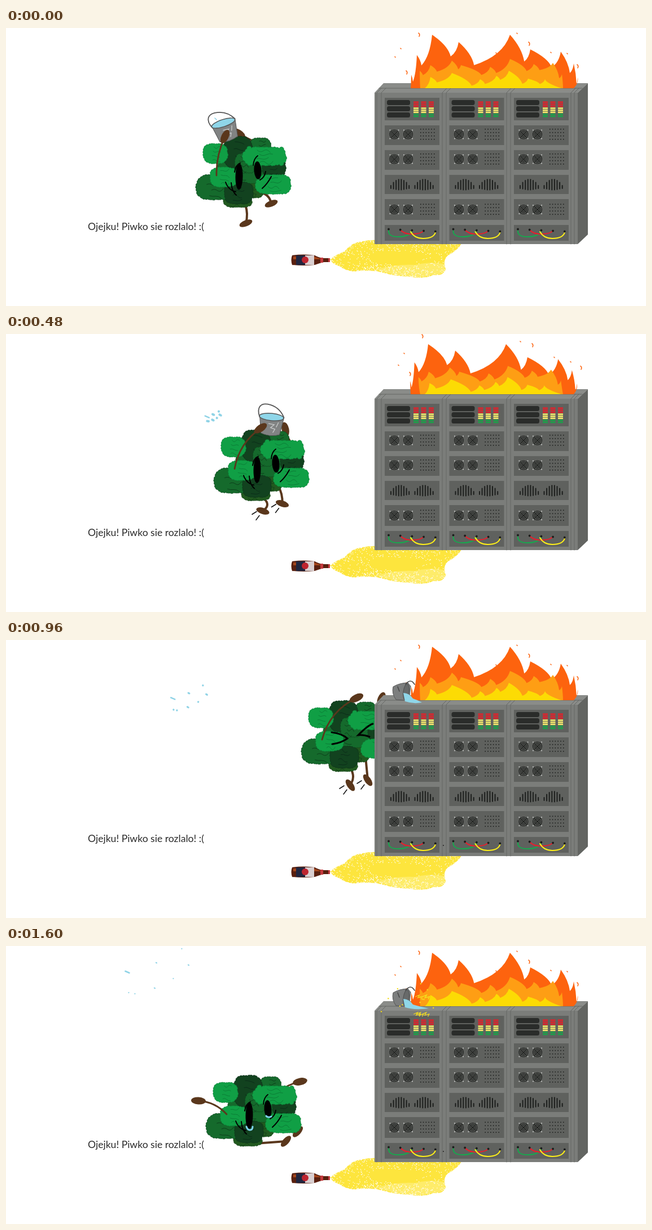
Animation, 1134 px wide and 494 px high, one loop 1760 ms. Source, as an HTML page:

```html
<!DOCTYPE html>
<html lang="pl">
<head>
<meta charset="utf-8">
<title>Piwko</title>
<style>
html, body { margin: 0; width: 100%; height: 100%; overflow: hidden; background: #fff; }
svg { display: block; width: 100%; height: 100%; }
</style>
</head>
<body>
<svg viewBox="0 0 1134 494" preserveAspectRatio="none">
  <path id="puddle" fill="#fde53d" d="M574 411Q588 401 600 397Q612 381 632 379Q650 375 670 378L807 383Q800 396 783 404Q773 414 779 428Q776 441 758 439Q738 447 716 442Q685 441 657 432Q632 430 616 433Q598 430 590 423Q578 419 574 411Z"/>
  <path fill="#feec6a" d="M656 429Q690 419 725 421Q755 414 778 420L777 433Q768 440 756 438Q735 446 714 441Q685 440 656 429Z"/>
  <path id="foam" stroke="#fff" stroke-width="1.2"/>
  <path fill="#59200f" d="M507 404Q528 401 547 404Q556 409 564 409L574 409V416L563 416Q555 418 547 421Q528 423 507 421Q504 412 507 404Z"/>
  <path fill="#a4461b" d="M509 406H546L560 411H509Z"/>
  <path fill="#20263f" d="M514 404H530V421H514Z"/>
  <path fill="#d9cfd0" d="M530 404H546V421H530Z"/>
  <circle cx="530" cy="412" r="6" fill="#bd2530"/>
  <path fill="#c43a3e" d="M557 408H562V417H557ZM571 409H574V416H571Z"/>
  <text x="145" y="358.5" font-family="Lato, 'Open Sans', sans-serif" font-size="17.6" fill="#2b2b2b">Ojejku! Piwko sie rozlalo! :(</text>
  <g id="drops" stroke="#8fd3e6" fill="#8fd3e6" stroke-linecap="round"></g>
  <g id="back"></g>
  <g id="bush"></g>
  <g id="front"></g>
  <g id="face" fill="none" stroke="#000" stroke-linecap="round"></g>
  <path id="marks" fill="none" stroke="#111" stroke-width="1.5" stroke-linecap="round"/>
  <g id="rack"></g>
  <g id="fire"></g>
  <g id="spill"></g>
</svg>
<script>
const $ = id => document.getElementById(id);
const STEP = 160, COUNT = 11, RAD = Math.PI / 180;

let seed = 7;
const rnd = (a = 0, b = 1) => a + (b - a) * ((seed = (seed * 16807) % 2147483647) / 2147483647);
const n1 = v => Math.round(v * 10) / 10;
const mix = (a, b, t) => a + (b - a) * t;
const range = n => [...Array(n).keys()];
const path = (d, attrs = '') => `<path d="${d}" ${attrs}/>`;
const line = (d, color, width) => path(d, `fill="none" stroke="${color}" stroke-width="${width}" stroke-linecap="round"`);
const rect = (x, y, w, h, fill, rx = 0) =>
  `<rect x="${n1(x)}" y="${n1(y)}" width="${n1(w)}" height="${n1(h)}" rx="${rx}" fill="${fill}"/>`;
const oval = (x, y, rx, ry, rot, attrs) =>
  `<ellipse cx="${n1(x)}" cy="${n1(y)}" rx="${rx}" ry="${ry}" transform="rotate(${n1(rot)} ${n1(x)} ${n1(y)})" ${attrs}/>`;
const dot = (x, y, r, fill) => oval(x, y, r, r, 0, `fill="${fill}"`);

// White specks, densest along the puddle's edge
function foam() {
  const p = $('puddle'), len = p.getTotalLength();
  return range(700).map(() => {
    const a = p.getPointAtLength(rnd() * len), k = rnd() ** 2.2 * 0.6;
    return `M${n1(mix(a.x, 690, k))} ${n1(mix(a.y, 410, k))}h1.2`;
  }).join('');
}

// ---- server rack ----
function fan(x, y) {
  const ink = '#1b1d1b';
  let s = line(`M${x - 7} ${y - 7}l14 14m0 -14l-14 14`, ink, 0.8) + dot(x, y, 1.6, ink);
  for (const r of [8, 5.6, 3.2]) s += `<circle cx="${x}" cy="${y}" r="${r}" fill="none" stroke="${ink}" stroke-width="1.1"/>`;
  for (const a of [-7.5, 7.5]) for (const b of [-7.5, 7.5]) s += dot(x + a, y + b, 1.1, '#c9cbc9');
  return s;
}
function cabinet() {
  let s = '';
  for (const [y, h] of [[124, 40], [173, 35], [217, 35], [261, 34], [304, 37], [350, 28]])
    s += rect(671, y, 97, h, '#5f615e');
  for (const y of [128, 139, 150]) s += rect(675, y, 41, 9, '#2a2c2a', 3.5);
  for (const c of range(3)) for (const r of range(8))
    s += rect(722 + c * 13.5, 130.5 + r * 3.6, 9, 2.6, r < 3 ? '#e3202a' : r < 6 ? '#f6ec6c' : '#1ca049');
  for (const y of [189, 233, 322.5]) {
    s += fan(688, y) + fan(712.5, y);
    for (const c of range(6)) for (const r of range(4)) s += rect(734 + c * 4.8, y - 10 + r * 6, 1.5, 1.5, '#171917');
  }
  for (const cx of [698, 740.5]) for (const i of range(8)) {
    const u = Math.abs(i - 3.5) / 3.5, top = 268 + 11 * u * u;
    s += rect(cx - 17 + i * 4.6, top, 2, 289 - 3 * u - top, '#1d1f1d', 1);
  }
  s += line('M678 360Q677 371 695 371Q714 371 719 361', '#17a84e', 2)
     + line('M698 358Q706 367 720 366Q736 366 740 360', '#ec1c2b', 2)
     + line('M717 362Q724 374 739 374Q758 374 761 363', '#fff018', 2);
  return s + range(5).map(i => dot(678 + i * 20.7, 357.5 + i, 1.9, '#1b1d1b')).join('');
}
function rack() {
  let s = path('M653 115L669 98H1031L1013 115Z', 'fill="#8a8c89"')
        + path('M1013 115L1031 98V367L1013 384Z', 'fill="#636562"')
        + rect(653, 115, 360, 269, '#7b7d7a');
  let d = 'M661 107H1021';
  for (const x of [657, 665, 773, 780, 887, 894, 1001, 1007]) d += `M${x} 384V115l8 -8`;
  s += line(d, '#666865', 1);
  const c = cabinet();
  return s + range(3).map(i => `<g transform="translate(${i * 114.5})">${c}</g>`).join('');
}

// ---- fire: each layer is a row of tips; valleys follow from the gaps ----
const layers = [
  { fill: '#fd630e', from: 717, to: 1006, dip: 9, slope: 0.35,
    tips: [[718, 83], [728, 48], [755, 12], [802, 25], [893, 12], [929, 38], [983, 42], [1006, 63], [1013, 88]] },
  { fill: '#fe9e14', from: 734, to: 987, dip: 4, slope: 0.2,
    tips: [[733, 76], [752, 66], [790, 58], [806, 66], [858, 69], [893, 55], [935, 64], [969, 62], [985, 82]] },
  { fill: '#fcdb04', from: 742, to: 984, dip: 4, slope: 0.15,
    tips: [[752, 87], [790, 80], [840, 91], [869, 85], [891, 76], [925, 90], [955, 91]] }
];
const embers = [[709, 76], [699, 36], [689, 51], [731, 9], [868, 44], [905, 9], [926, 25], [965, 43], [994, 45], [1012, 65]];

function layer({ fill, from, to, dip, slope, tips }, sway) {
  const pts = tips.map(([x, y]) => {
    const lift = sway * (107 - y) / 95;
    return [x - 7 * lift, y + 6 * lift * lift];
  });
  let [a, b] = [from, 107], d = `M${a} ${b}`;
  const curve = (cx, cy, x, y) => { d += `Q${n1(cx)} ${n1(cy)} ${n1(x)} ${n1(y)}`; [a, b] = [x, y]; };
  pts.forEach(([x, y], i) => {
    curve(mix(a, x, 0.8), mix(b, y, 0.3), x, y);
    const next = pts[i + 1];
    if (!next) return curve(x + 2, 98, to, 107);
    const gap = next[0] - x, vx = mix(x, next[0], y > next[1] ? 0.3 : 0.7);
    const vy = Math.max(y, next[1]) + dip + slope * gap;
    curve(mix(x, vx, 0.85), mix(y, vy, 0.5), vx, vy);
  });
  return path(d + 'Z', `fill="${fill}"`);
}
const fire = sway => layers.map(l => layer(l, sway)).join('')
  + line(embers.map(([x, y], i) => `M${x + sway * 6} ${y + sway * (i % 3 * 6 - 8)}` + (i % 3 ? 'l1 1' : 'q3 2 1 6')).join(''), '#fc6512', 1.6);

// ---- bush ----
function blob(cx, cy, rx, ry, fill, ink) {
  const n = Math.round((rx + ry) * 0.7);
  const ring = range(n).map(i => {
    const a = i / n * 2 * Math.PI, c = Math.cos(a), s = Math.sin(a);
    const r = (Math.abs(c / rx) ** 3 + Math.abs(s / ry) ** 3) ** (-1 / 3) * rnd(0.93, 1);
    return `${n1(cx + c * r)} ${n1(cy + s * r)}`;
  });
  const folds = range(4).map(i => {
    const w = rx * 0.3;
    return `M${n1(cx + rx * rnd(-0.6, -0.1))} ${n1(cy + ry * (i / 3 - 0.5) * 1.3)}q${n1(w / 2)} ${n1(rnd(-6, 6))} ${n1(w)} 1t${n1(w)} ${n1(rnd(-4, 4))}`;
  });
  return path('M' + ring.join('A4 4 0 0 1 ') + 'Z', `fill="${fill}" stroke="${ink}" stroke-width=".6"`)
       + line(folds.join(''), ink, 1);
}
function bush() {
  const mid = ['#156a2c', '#0c3f1b'], dark = ['#12421f', '#0b2c19'], lit = ['#109f45', '#0b7d36'], moss = ['#21591f', '#12401a'];
  return [
    [420, 257, 46, 40, mid], [411, 307, 26, 12, moss], [440, 289, 17, 13, moss], [451, 212, 19, 17, mid],
    [411, 221, 27, 29, dark], [475, 247, 21, 19, dark], [425, 240, 20, 18, mid], [371, 283, 35, 23, mid],
    [412, 293, 26, 20, dark], [371, 223, 22, 18, lit], [458, 228, 39, 17, lit], [386, 265, 25, 18, lit], [474, 278, 32, 18, lit]
  ].map(([x, y, rx, ry, tone]) => blob(x, y, rx, ry, ...tone)).join('');
}

// ---- faces, in bush coordinates ----
const openEyes = oval(413, 264, 6.5, 23.5, 1, 'fill="#000" stroke="none"') + oval(446, 253, 6.5, 16, -4, 'fill="#000" stroke="none"')
  + line('M405 256Q407 243 415 240M438 244Q439 232 446 227M389 274Q394 288 407 291M399 275Q400 290 408 297M470 264Q464 276 454 285M460 255Q458 266 450 270', '#000', 2);
const shutEyes = line('M390 249Q408 251 418 260Q407 268 391 270M463 234Q455 236 437 254Q446 253 457 257', '#000', 3);
const tears = line('M408 284Q410 290 414 290Q419 290 419 284M443 265Q446 269 452 266', '#7fd4f0', 3);

// ---- motion keys: at = bush shift, the rest in bush coordinates ----
const keys = [
  { step: 0, at: [0, 0], hand: [388, 193], far: [412, 187], foot: [425, 347], toe: [470, 312], tilt: [-22], pail: [385, 169, -18] },
  { step: 2, at: [2, 16], hand: [403, 193], far: [453, 192], foot: [423, 331], toe: [463, 312], tilt: [-16], pail: [420, 172, 2] },
  { step: 4, at: [62, -61], hand: [435, 187], far: [473, 192], foot: [423, 343], toe: [452, 336], tilt: [52], pail: [457, 168, 9] },
  { step: 6, at: [187, -85], hand: [434, 188], far: [478, 190], foot: [423, 343], toe: [454, 334], tilt: [55], pail: [513, 160, 90] },
  { step: 7, at: [81, -53], hand: [416, 185], far: [479, 190], foot: [458, 339], toe: [488, 317], tilt: [-50], pail: [0, 0, 0] },
  { step: 8, at: [18, 37], hand: [349, 185], far: [486, 189], foot: [478, 310], toe: [499, 293], tilt: [-48], pail: [0, 0, 0] },
  { step: 10, at: [18, 37], hand: [323, 238], far: [503, 204], foot: [478, 310], toe: [499, 293], tilt: [-48], pail: [0, 0, 0] }
];
function poseAt(i) {
  const b = keys.find(k => k.step >= i), a = keys.findLast(k => k.step <= i);
  const t = a === b ? 0 : (i - a.step) / (b.step - a.step), pose = {};
  for (const name of ['at', 'hand', 'far', 'foot', 'toe', 'tilt', 'pail']) pose[name] = a[name].map((v, j) => mix(v, b[name][j], t));
  return pose;
}

// Curved limb ending in a pad; the pad follows the limb unless tilt is given
const brown = '#5a371c';
function limb([x, y], [ex, ey], bend, width, tilt) {
  const dx = ex - x, dy = ey - y, len = Math.hypot(dx, dy);
  const cx = (x + ex) / 2 + dy / len * bend, cy = (y + ey) / 2 - dx / len * bend;
  const foot = tilt !== undefined, rot = foot ? tilt : Math.atan2(ey - cy, ex - cx) / RAD;
  return line(`M${x} ${y}Q${n1(cx)} ${n1(cy)} ${n1(ex)} ${n1(ey)}`, brown, width)
    + oval(ex, ey, foot ? 12 : 13, foot ? 5.5 : 6.5, rot, `fill="${brown}"`);
}
const leg = (hip, end, tilt) => limb(hip, end, Math.max(0, 38 - Math.hypot(end[0] - hip[0], end[1] - hip[1])), 4, tilt);

function pail([x, y, rot]) {
  return `<g transform="translate(${x} ${y}) rotate(${rot})">`
    + line('M-21 2C-29 -16 -20 -23 -9 -22Q12 -20 22 -1', '#555', 1.8)
    + path('M-21 0L-16 30Q0 36 17 30L22 0Z', 'fill="#818383" stroke="#555"')
    + line('M-4 12L6 13L0 19L8 21L5 27M13 9L10 17', '#c8caca', 1.3)
    + oval(0, 0, 21.5, 6.5, 0, 'fill="#8fd6e9" stroke="#555" stroke-width="1.4"') + '</g>';
}

// Strokes behind the feet in flight, rays from the rack after the bump
function marks(i, p) {
  if (i === 7 || i === 8) return range(3).map(k => {
    const a = -k * (i === 7 ? 19 : 36) * RAD, c = Math.cos(a), s = Math.sin(a);
    return `M${n1(420 + 99 * c)} ${n1(258 + 99 * s)}l${n1(22 * c)} ${n1(22 * s)}`;
  }).join('');
  if (i < 3 || i > 6) return '';
  return [p.foot, p.toe].map(([x, y]) => `M${n1(x - 11)} ${n1(y + 1)}l-8 5M${n1(x - 6)} ${n1(y + 8)}l-6 8`).join('');
}

// ---- splash: drifts up and left while spreading ----
const splash = [[52, -16], [82, 12], [97, -41], [109, -12], [3, 37], [14, 39], [49, 29]];
function drops(i) {
  if (i < 2) return path('M370 160l3 3M378 164h2', 'stroke-width="1.6"');
  const x = 376 - (i - 2) * 20.2, y = 161 - (i - 2) * 14.4, s = 0.33 + 0.67 * (i - 4) / 6, r = n1(2.5 - i * 0.14);
  return path(`M${n1(x - 3)} ${n1(y - 1)}l7 3`, 'stroke-width="2.6"')
    + splash.map(([dx, dy], j) => oval(x + dx * s, y + dy * s, n1(r * (j % 3 ? 1 : 1.6)), r, 30, 'stroke="none"')).join('');
}

// ---- tipped pail on the rack, with sparks that multiply ----
const sparks = range(12).map(() => dot(rnd(665, 765), rnd(64, 121), 1.2, '#f4dc1e'));
const bolts = range(6).map(i => line(`M${n1(rnd(696, 742))} ${i % 2 ? 121 : 90}l7 -3l-3 5l8 -2l-2 4`, '#f4dc1e', 1.2));
function spill(i) {
  if (i < 6) return '';
  const reach = i < 8 ? 737 : 749, n = (i - 7) * 4;
  return dot(775, 365, 1, '#222')
    + path('M686 83Q698 76 712 76L717 82L715 100L705 107L691 106Q683 95 686 83Z', 'fill="#7c7e7e" stroke="#555"')
    + oval(709, 92, 5, 14, 8, 'fill="#686a6a" stroke="#505252"')
    + line('M708 79Q717 67 724 79M694 83l3 8', '#484848', 1.6)
    + path(`M704 94Q714 94 721 104Q730 107 ${reach} 111Q722 114 707 109Z`, 'fill="#8fd6e9"')
    + (i < 8 ? '' : bolts.slice(0, n / 2).join('') + sparks.slice(0, n).join(''));
}

function show(i) {
  const p = poseAt(i);
  for (const id of ['back', 'bush', 'front', 'face', 'marks']) $(id).setAttribute('transform', `translate(${p.at})`);
  $('back').innerHTML = limb([474, 216], p.far, 3, 2.8) + leg([424, 314], p.foot, p.tilt[0]) + leg([450, 292], p.toe, p.tilt[0]);
  $('front').innerHTML = (i < 6 ? pail(p.pail) : '') + limb([373, 262], p.hand, (p.hand[0] - 360) * 0.3, 2.8);
  $('face').innerHTML = i > 5 && i < 9 ? shutEyes : openEyes + (i === 10 ? tears : '');
  $('marks').setAttribute('d', marks(i, p));
  $('drops').innerHTML = drops(i);
  $('fire').innerHTML = fire(i % 2);
  $('spill').innerHTML = spill(i);
}

$('foam').setAttribute('d', foam());
$('rack').innerHTML = rack();
$('bush').innerHTML = bush();
const start = performance.now();
let last = 0;
function tick(now) {
  const i = Math.floor(Math.max(0, now - start) / STEP) % COUNT;
  if (i !== last) show(last = i);
  requestAnimationFrame(tick);
}
show(0);
requestAnimationFrame(tick);
</script>
</body>
</html>
```
